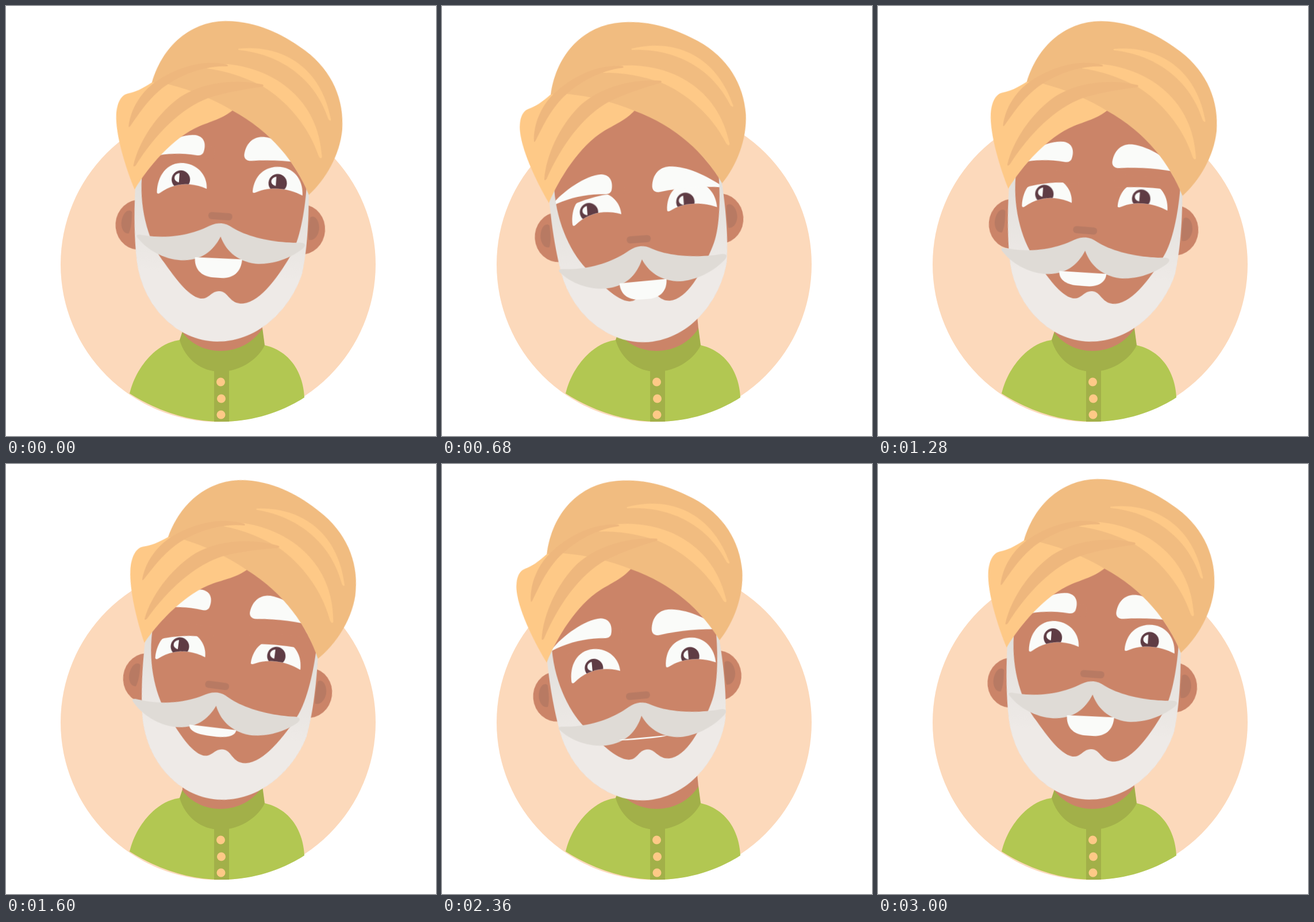
An HTML page without scripts for the animation above (3040 ms loop, 748 by 748 pixels).

```html
<!DOCTYPE html>
<html lang="en">
<head>
<meta charset="utf-8">
<title>Man in a turban</title>
<style>
  html, body { margin: 0; width: 100%; height: 100%; overflow: hidden; background: #fff; }
  svg { display: block; width: 100%; height: 100%; }
  .skin { fill: #cb8468; }
  .shade { fill: #b87a63; }
  .white { fill: #fafbf9; }
  .iris { fill: #5f3c44; }
  .green { fill: #b2c752; }
  .collar { fill: #a2b049; }
  .cloth { fill: #f1bc80; }
  .light { fill: #fec987; }
  .fold { fill: #eeb77d; }

  .head, .face, .brows, .look, .lid, .mouth {
    animation: 3040ms cubic-bezier(.37, 0, .63, 1) infinite;
  }
  .head { animation-name: tilt; transform-origin: 367px 593px; }
  .face { animation-name: turn; }
  .brows { animation-name: raise; }
  .look { animation-name: look; }
  .lid { animation-name: squint; }
  .mouth { animation-name: talk; transform-origin: 360px 457px; }

  /* extremes rest for one 40 ms tick */
  @keyframes tilt {
    0%, 1.316% { transform: rotate(4deg); animation-timing-function: cubic-bezier(.12, 0, .39, 0); }
    13.158% { transform: rotate(0deg); animation-timing-function: cubic-bezier(.61, 1, .88, 1); }
    25%, 26.316% { transform: rotate(-4.5deg); }
    50%, 51.316% { transform: rotate(7.6deg); animation-timing-function: cubic-bezier(.12, 0, .39, 0); }
    63.158% { transform: rotate(0deg); animation-timing-function: cubic-bezier(.61, 1, .88, 1); }
    75%, 76.316% { transform: rotate(-5.2deg); }
    98.684%, 100% { transform: rotate(4deg); }
  }
  @keyframes turn {
    0%, 1.316% { transform: translate(-1px, -18px); animation-timing-function: cubic-bezier(.12, 0, .39, 0); }
    13.158% { transform: translate(0, 0); animation-timing-function: cubic-bezier(.61, 1, .88, 1); }
    25%, 26.316% { transform: translate(-2px, 22px); }
    50%, 51.316% { transform: translate(-18px, 3px); animation-timing-function: cubic-bezier(.12, 0, .39, 0); }
    63.158% { transform: translate(-9px, 14px); animation-timing-function: cubic-bezier(.61, 1, .88, 1); }
    75%, 76.316% { transform: translate(0, 18px); }
    98.684%, 100% { transform: translate(-1px, -18px); }
  }
  @keyframes raise {
    0%, 1.316% { transform: translate(1px, -28px); animation-timing-function: cubic-bezier(.12, 0, .39, 0); }
    13.158% { transform: translate(0, 0); animation-timing-function: cubic-bezier(.61, 1, .88, 1); }
    25%, 26.316% { transform: translate(-4px, 33px); }
    50%, 51.316% { transform: translate(-10px, -31px); animation-timing-function: cubic-bezier(.12, 0, .39, 0); }
    63.158% { transform: translate(-6px, -8px); animation-timing-function: cubic-bezier(.61, 1, .88, 1); }
    75%, 76.316% { transform: translate(2px, 6px); }
    98.684%, 100% { transform: translate(1px, -28px); }
  }
  @keyframes look {
    0%, 13.158% { transform: translate(0, 0); }
    25%, 26.316% { transform: translate(-11px, 6px); }
    50%, 51.316% { transform: translate(0, 0); }
    63.158% { transform: translate(0, 4px); }
    75%, 76.316% { transform: translate(1px, 4px); }
    98.684%, 100% { transform: translate(0, 0); }
  }
  @keyframes squint {
    0%, 13.158% { transform: translateY(-20px); }
    25%, 51.316% { transform: translateY(0); }
    63.158%, 100% { transform: translateY(-20px); }
  }
  @keyframes talk {
    0%, 1.316% { transform: scaleY(1); }
    13.158% { transform: scaleY(.41); }
    25%, 33% { transform: scaleY(1); }
    50%, 51.316% { transform: scaleY(.46); }
    63.158% { transform: scaleY(.27); }
    75%, 76.316% { transform: scaleY(.07); }
    98.684%, 100% { transform: scaleY(1); }
  }
</style>
</head>
<body>
<svg viewBox="0 0 748 748">
  <defs>
    <linearGradient id="hair" gradientUnits="userSpaceOnUse" x1="0" y1="310" x2="0" y2="470">
      <stop offset="0" stop-color="#e2dfdb"/>
      <stop offset="1" stop-color="#eeeae7"/>
    </linearGradient>
    <path id="eyeL" d="M245 350C244 322 258 296 288 296C316 297 331 318 331 338C305 328 275 330 250 351Q246 354 245 350Z"/>
    <path id="eyeR" d="M411 337C412 310 428 291 456 291C484 292 498 315 498 338C470 326 440 326 417 338Q411 341 411 337Z"/>
    <clipPath id="clipL"><use href="#eyeL"/></clipPath>
    <clipPath id="clipR"><use href="#eyeR"/></clipPath>
    <g id="pupil">
      <circle class="iris" r="16"/>
      <path class="white" d="M-3-11C-14-9-14 4-3 5Z"/>
    </g>
  </defs>

  <circle cx="369" cy="449.500" r="274" fill="#fcd9bb"/>

  <g>
    <path class="green" d="M215 674C226 628 262 586 302 581L450 590C494 600 517 638 519 681C475 709 425 723 374 723C320 723 266 706 215 674Z"/>
    <path class="collar" d="M307 566L302 581C312 615 340 636 372 636C410 636 440 612 450 590L446 560Z"/>
    <path class="collar" d="M362 630H388V723H362Z"/>
    <g class="light">
      <circle cx="373.500" cy="654" r="7.500"/>
      <circle cx="374.500" cy="683" r="7.500"/>
      <circle cx="374" cy="711" r="7.500"/>
    </g>
    <path class="skin" d="M307 530V568C322 588 346 600 373 600C405 600 431 584 446 561L443 530Z"/>
  </g>

  <g class="head">
    <ellipse class="skin" cx="217" cy="390.500" rx="41" ry="43.500"/>
    <ellipse class="skin" cx="500" cy="379" rx="40.500" ry="43.500"/>
    <path class="shade" d="M200 367C190 366 186 380 186 390C187 402 193 408 200 407C204 398 204 382 203 369Z"/>
    <path class="shade" d="M513 357C521 351 530 362 530 377C529 390 521 398 513 396C511 385 511 370 513 357Z"/>
    <path class="skin" d="M208 318C208 370 212 415 217 445C229 525 290 583 360 583C435 582 489 520 505 455C510 420 511 370 506 308L400 160H320Z"/>

    <g class="face">
      <use href="#eyeL" class="white"/>
      <use href="#eyeR" class="white"/>
      <g clip-path="url(#clipL)"><g class="look"><use href="#pupil" x="285" y="325"/></g></g>
      <g clip-path="url(#clipR)"><g class="look"><use href="#pupil" x="453.500" y="319.500"/></g></g>
      <g class="lid skin">
        <path d="M240 323L256 315Q288 305 313 304L340 305V284H240Z"/>
        <path d="M402 306L425 303Q455 300 484 301Q494 303 502 314V282H402Z"/>
      </g>
    </g>

    <g class="brows white">
      <path d="M213 303C235 280 275 256 303 256C322 258 322 275 319 285C317 290 313 291 308 291C275 288 245 292 213 305Z"/>
      <path d="M390 284C392 262 405 251 422 251C455 253 485 272 512 292L511 294C475 289 440 289 403 294C395 295 390 291 390 284Z"/>
    </g>

    <path fill="url(#hair)" d="M206 318C206 370 211 415 216 445C228 525 290 584 360 584C435 583 490 520 506 455C511 420 512 370 507 308L503 306C503 350 497 400 484 425C462 470 432 515 402 515C382 514 380 496 365 496C350 496 348 512 332 511C310 508 285 477 266 454C238 424 216 368 216 308Z"/>

    <g class="face">
      <rect class="shade" x="337" y="377.500" width="42" height="12.500" rx="6"/>
      <path fill="#dfdbd6" d="M216 430C214 425 219 425 226 426C270 430 310 420 340 402Q361 390 380 402C410 418 460 424 500 420C509 420 511 424 504 431C480 452 450 462 425 462C390 460 370 440 361 419C350 445 330 464 295 465C265 465 235 452 216 430Z"/>
      <path class="mouth white" d="M319 458L401 456C401 478 388 490 368 491H352C331 490 319 478 319 458Z"/>
    </g>

    <path class="light" d="M222 142C205 155 195 160 182 164C168 168 164 185 164 202C165 240 190 300 205 330C225 290 265 235 310 212C335 200 350 195 365 181L380 120Z"/>
    <path class="cloth" d="M222 142C238 70 290 25 356 26C405 26 450 46 484 68C535 101 558 150 558 201C557 245 535 290 508 318C482 265 436 213 365 181C330 163 290 150 250 143Z"/>
    <g class="light">
      <path d="M368 73C440 60 513 92 537 184C538 188 534 187 532 183C507 122 450 78 368 75Z"/>
      <path d="M315 111C335 103 340 102 352 101C435 104 513 152 526 250C526 255 522 253 520 249C498 196 455 156 416 136C385 122 350 113 315 111Z"/>
    </g>
    <g class="fold">
      <path d="M187 221C188 190 205 162 222 146C260 112 310 95 350 102Q354 104 350 105C305 107 270 128 250 143C222 164 205 195 190 220Q187 224 187 221Z"/>
      <path d="M200 288C206 248 232 200 268 168C305 136 365 125 414 132Q418 134 414 136C380 143 350 151 322 162C275 184 235 230 204 288Q200 292 200 288Z"/>
    </g>
  </g>
</svg>
</body>
</html>
```
